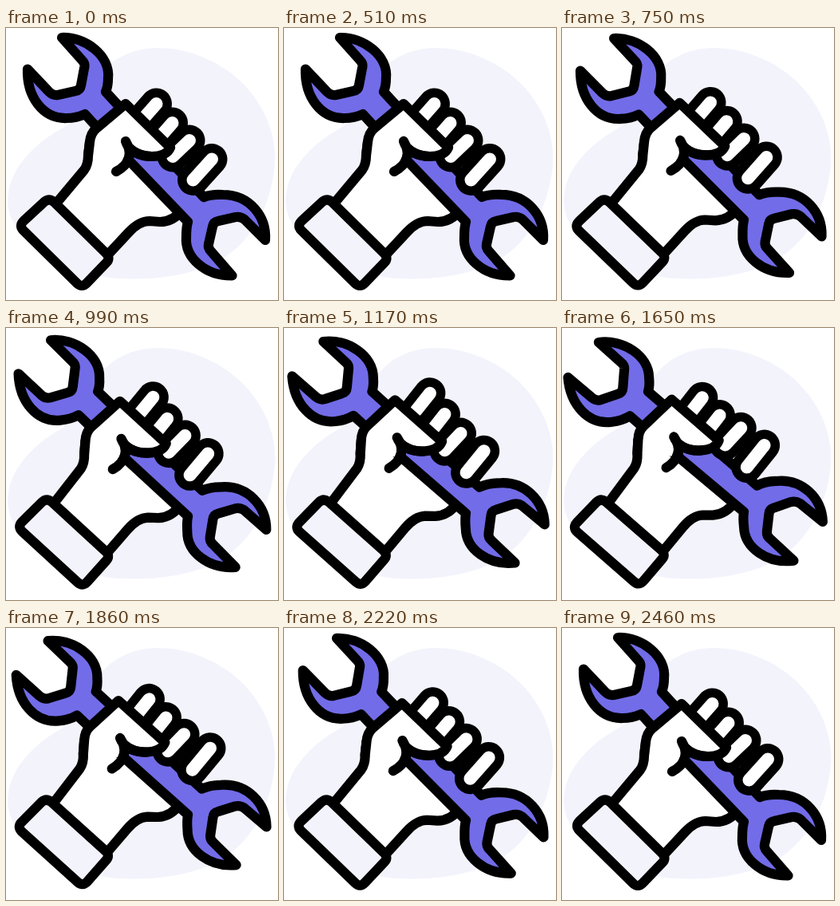
Animation of 341 by 341 pixels, one loop 3630 ms. Source, as an HTML page:

```html
<!DOCTYPE html>
<html lang="en">
<head>
<meta charset="utf-8">
<title>Hand with wrench</title>
<style>
html, body { margin: 0; height: 100%; overflow: hidden; background: #fff; }
svg { display: block; width: 100%; height: 100%; }
.ink { stroke: #000; stroke-width: 12.2; stroke-linecap: round; stroke-linejoin: round; fill: #fff; }
.finger { fill: none; stroke-linecap: round; }
</style>
</head>
<body>
<svg viewBox="0 0 341 341">
  <path fill="#f3f3fc" d="M190 25C230 25 273 43 301 74C326 101 340 138 337 172C331 232 300 282 247 301C215 312 180 316 142 314C95 311 45 288 18 256C5 241 0 225 3 206C8 174 35 146 68 127C95 112 99 92 111 69C126 40 158 25 190 25Z"/>
  <g class="hand">
    <path class="ink" d="M62 221L98 178Q103 171 103 160L105 143L160 160L222 227Q210 243 193 243L180 242Q167 242 154 256L127 285Z"/>
  </g>
  <path id="wrench" class="ink" style="fill:#726ce8" d="M27 51.5L54 80Q59 85 65 84L87 79Q93 78 94 72L98.500 48Q99 44 95 40L70 12C100 11 131 35 128 63Q128 73 125 80L137 93L248 212Q258 208 272 209C305 209 327 236 325 266L299 240Q294 236 288 237L266 242Q260 243 259 249L254 271Q253 276 257 280L283.500 310.500C250 311 224 288 226 262Q226 250 228 243L110 120L99 108Q88 113 76 113C46 114 26 86 27 51.500Z"/>
  <g class="hand">
    <g id="fingers"></g>
    <path class="ink" d="M103 160L105 143Q106 132 113 126L150 95L206 150Q201 161 183 161Q166 161 155 151Q157 158 152 167"/>
    <path class="ink" style="fill:none" d="M150 142C158 155 157 170 138 180M150 142C153 152 165 161 183 161"/>
    <path class="ink" style="fill:#f3f3fc" d="M22 242L48 218Q54 213 60 218L126 283Q131 289 126 294L101 320Q95 326 89 320L22 254Q16 248 22 242Z"/>
  </g>
</svg>
<script>
const LOOP = 3630, STEP = 30;
const $ = id => document.getElementById(id);

// each finger is a capsule: lower end, then tip
const fingers = [[170, 116, 188.5, 95], [191, 139, 208.5, 119], [209, 161, 230, 141], [234.5, 190.5, 258, 164.5]];
const capsule = ([x1, y1, x2, y2]) => '<g>' + [['#000', 39], ['#fff', 16]].map(([color, width]) =>
  `<path class="finger" stroke="${color}" stroke-width="${width}" d="M${x1} ${y1}L${x2} ${y2}"/>`).join('') + '</g>';
$('fingers').innerHTML = fingers.map(capsule).join('');

const move = (node, transform) => node.setAttribute('transform', transform);

// smooth rise and fall around a peak time
function bump(t, peak, half) {
  const x = Math.max(0, 1 - Math.abs(t - peak) / half);
  return x * x * (3 - 2 * x);
}

function draw(now) {
  const t = Math.floor(now % LOOP / STEP) * STEP;
  const s = bump(t, 1470, 990);
  move($('wrench'), `translate(${-9.5 * s} ${-7 * s}) rotate(${-6.8 * s} 176 160)`);
  for (const hand of document.querySelectorAll('.hand')) move(hand, `rotate(${-3.8 * s} 54 300)`);
  // the fingers lift one after another
  [...$('fingers').children].forEach((finger, i) => {
    const lift = 8.5 * bump(t, 1150 + 200 * i, 350);
    move(finger, `translate(${0.66 * lift} ${-0.75 * lift})`);
  });
}

const begin = performance.now();
function tick() {
  draw(performance.now() - begin);
  requestAnimationFrame(tick);
}
tick();
</script>
</body>
</html>
```
